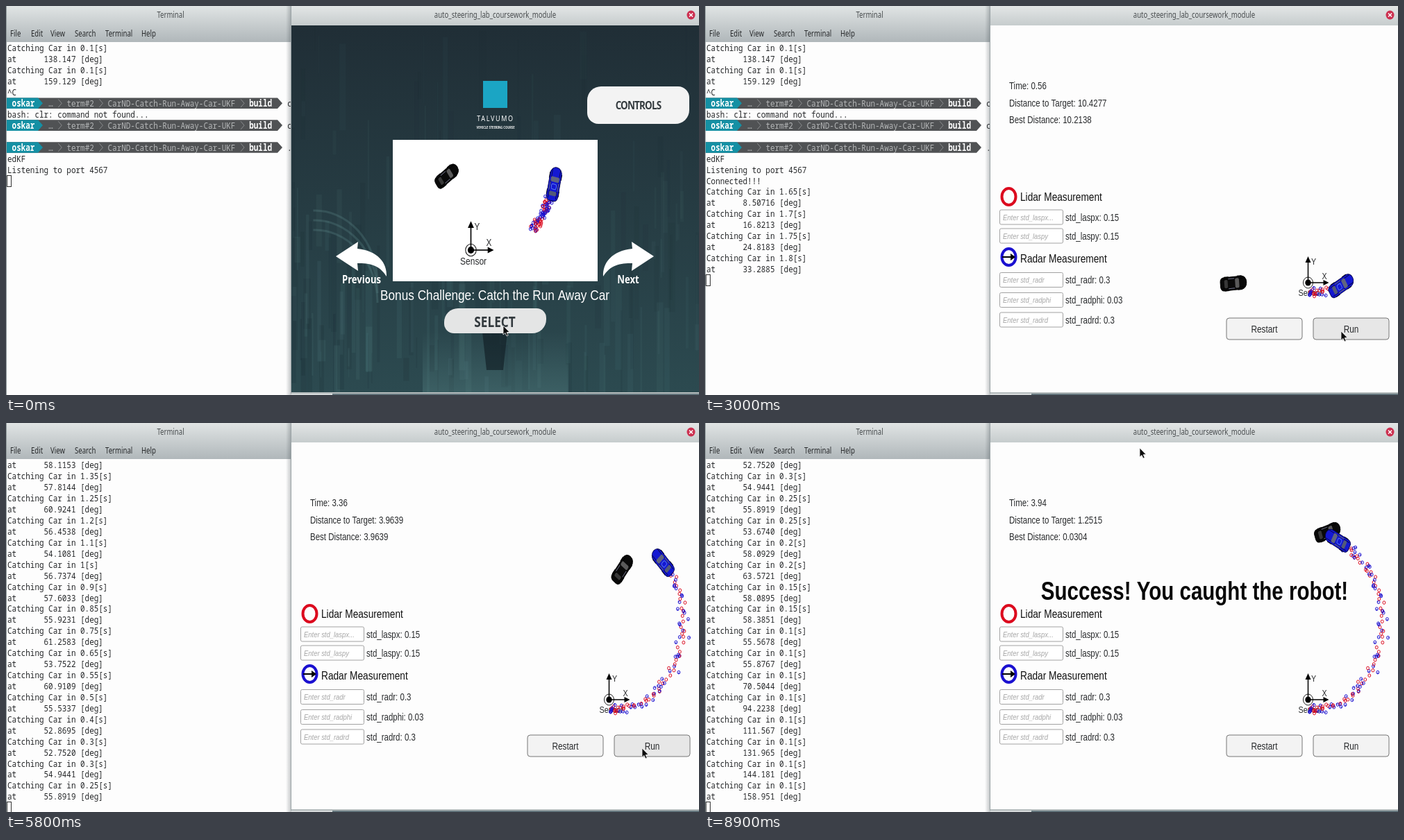
An HTML page with a canvas that plays this animation: 998 by 561 pixels, repeating every 9 s.

```html
<!DOCTYPE html>
<html lang="en">
<head>
<meta charset="utf-8">
<title>Catch the car</title>
<style>
html, body { margin: 0; width: 100%; height: 100%; overflow: hidden; background: #fdfdfd; }
canvas { display: block; }
</style>
</head>
<body>
<canvas id="stage" width="998" height="561"></canvas>
<script>
const ctx = document.getElementById('stage').getContext('2d');
const LOOP = 9000, MENU_END = 400, START = 2440, CAUGHT = 6380;
const CHASE = (CAUGHT - START) / 1000, SWING = 1100;
const SQUEEZE = 0.82;
const SANS = '"Liberation Sans", Arial, sans-serif';
const UI = '"Noto Sans", "Open Sans", sans-serif';
const MONO = '"Noto Sans Mono", "DejaVu Sans Mono", monospace';
const WHITE = '#fdfdfd', INK = '#282a2c', RED = '#dc0a1e', BLUE = '#1a10d0';

const smooth = u => u * u * (3 - 2 * u);
const rad = degrees => degrees * Math.PI / 180;

// Key points start with a time or index; the other columns are interpolated
function sample(keys, t, ease = u => u) {
  const i = keys.findIndex(k => k[0] > t);
  if (i < 0) return keys[keys.length - 1];
  if (i === 0) return keys[0];
  const a = keys[i - 1], b = keys[i], u = ease((t - a[0]) / (b[0] - a[0]));
  return a.map((v, c) => v + (b[c] - v) * u);
}

function seeded(seed) {
  return () => (seed = (seed * 16807) % 2147483647) / 2147483647;
}

// The runner steers onto a circle and follows it at a constant rate
function runnerAt(secs) {
  const grip = Math.min(1, secs / 0.5), angle = 73.4 - 33.2 * secs, r = 131 + 10 * grip;
  return {
    x: 835 + r * Math.cos(rad(angle)),
    y: 288 + r * Math.sin(rad(angle)),
    heading: (angle - 90) * grip
  };
}

const hunterPath = [[START, 721, 399, 0], [3000, 761, 400, -6], [4000, 815, 341, -58], [CAUGHT, 911, 169, -57]];

// After the catch the hunter swings back and forth across the runner
function hunterAt(t) {
  const [, x, y, heading] = sample(hunterPath, t);
  const late = Math.max(0, t - CAUGHT), swing = Math.sin(2 * Math.PI * late / SWING);
  return { x: x - 15 * swing, y: y - 12 * swing, heading: heading + late / 72 };
}

const pointer = [[1300, 716, 461], [2100, 916, 469], [6900, 916, 469], [8300, 626, 36]];

const entry = (secs, deg) => [`Catching Car in ${secs}[s]`, `at      ${deg} [deg]`];
const header = [...entry(0.1, '138.147'), ...entry(0.1, '159.129'), '^C', '$c',
  'bash: clr: command not found...', '$c', '', '$.', 'edKF', 'Listening to port 4567'];

// Trend of the readings: index, seconds to catch, angle
const trend = [[0, 1.65, 9], [4, 1.85, 41], [11, 2.15, 51], [20, 1.9, 59], [28, 1.45, 57],
  [41, 0.3, 58], [50, 0.1, 58], [56, 0.1, 164]];
const READINGS = 57;

function makeLog() {
  const rnd = seeded(915), lines = ['Connected!!!'];
  for (let i = 0; i < READINGS; i++) {
    const [, secs, deg] = sample(trend, i);
    const noise = (rnd() - 0.5) * (1 + i / 4);
    lines.push(...entry(+(Math.round(secs * 20) / 20).toFixed(2), (deg + noise).toPrecision(6)));
  }
  return lines;
}
const logLines = makeLog();

function makeTrail() {
  const rnd = seeded(4721), spread = () => rnd() + rnd() + rnd() - 1.5;
  return Array.from({ length: 150 }, (_, i) => {
    const secs = CHASE * smooth(i / 150), { x, y } = runnerAt(secs);
    const radar = i % 2, noise = radar ? 8 : 4.5;
    return { secs, radar, x: x + spread() * noise, y: y + spread() * noise, turn: rnd() * 6.28 };
  });
}
const trail = makeTrail();

function text(s, x, y, size, { color = INK, font = SANS, style = '', align = 'left', gap = 0 } = {}) {
  ctx.save();
  ctx.translate(x, y + size * 0.36);
  ctx.scale(SQUEEZE, 1);
  ctx.font = `${style} ${size}px ${font}`;
  ctx.textAlign = align;
  ctx.letterSpacing = gap + 'px';
  ctx.fillStyle = color;
  ctx.fillText(s, 0, 0);
  ctx.restore();
}

function rect(x, y, w, h, color) {
  ctx.fillStyle = color;
  ctx.fillRect(x, y, w, h);
}

function box(x, y, w, h, r, fill, stroke) {
  ctx.beginPath();
  ctx.roundRect(x, y, w, h, r);
  ctx.fillStyle = fill;
  ctx.fill();
  if (!stroke) return;
  ctx.strokeStyle = stroke;
  ctx.lineWidth = 1;
  ctx.stroke();
}

function poly(points, color) {
  ctx.beginPath();
  points.forEach(([x, y]) => ctx.lineTo(x, y));
  ctx.closePath();
  ctx.fillStyle = color;
  ctx.fill();
}

function oval(x, y, rx, ry, color, width) {
  ctx.beginPath();
  ctx.ellipse(x, y, rx, ry, 0, 0, 7);
  ctx.fillStyle = ctx.strokeStyle = color;
  ctx.lineWidth = width;
  width ? ctx.stroke() : ctx.fill();
}

function line(x1, y1, x2, y2, color, width) {
  ctx.beginPath();
  ctx.moveTo(x1, y1);
  ctx.lineTo(x2, y2);
  ctx.strokeStyle = color;
  ctx.lineWidth = width;
  ctx.stroke();
}

function shade(x, y, w, h, from, to, sideways) {
  const g = ctx.createLinearGradient(x, y, sideways ? x + w : x, sideways ? y : y + h);
  g.addColorStop(0, from);
  g.addColorStop(1, to);
  rect(x, y, w, h, g);
}

function car({ x, y, heading }, blue, scale = 1) {
  const body = blue ? '#1418d2' : '#0a0a0a', edge = blue ? '#060650' : '#000';
  const h = rad(heading);
  ctx.save();
  ctx.translate(x, y);
  ctx.scale(scale * SQUEEZE, scale);
  ctx.rotate(Math.atan2(Math.sin(h), Math.cos(h) / SQUEEZE));
  for (const wx of [-16, 7]) rect(wx, -10.5, 8, 21, '#050508');
  box(-23, -9.5, 46, 19, [6, 9, 9, 6], body, edge);
  for (const side of [-1, 1]) {
    line(-20, 6.5 * side, 20, 6.5 * side, edge, 1);
    line(-9, 7 * side, 2, 7 * side, '#70738a', 1);
  }
  box(-16, -6, 6, 12, 2, blue ? '#535a78' : '#383838');
  box(3, -7, 7, 14, 2, blue ? '#606580' : '#5a5a5a');
  if (blue) box(-7, -4, 7, 8, 2, body, '#5a7cf0');
  ctx.restore();
}

function dot({ x, y, radar, turn }) {
  oval(x, y, 1.9, 2.3, radar ? BLUE : RED, 1);
  if (radar) line(x, y, x + 2 * Math.cos(turn), y + 2.3 * Math.sin(turn), BLUE, 1);
}

function axes(x, y, scale) {
  ctx.save();
  ctx.translate(x, y);
  ctx.scale(scale, scale);
  oval(0, 0, 7, 8, '#222', 1);
  oval(0, 0, 4.2, 4.6, '#000');
  line(0, 0, 0, -32, '#000', 1.5);
  line(0, 0, 25, 0, '#000', 1.5);
  poly([[0, -38], [-4, -29], [4, -29]], '#000');
  poly([[30, 0], [22, -4], [22, 4]], '#000');
  text('Y', 4.5, -31, 13);
  text('X', 20, -10, 13);
  text('Sensor', -14, 14.5, 13.3);
  ctx.restore();
}

function prompt(y, command) {
  const cell = k => 2 + k * 6.57, top = y - 7.8, low = y + 7.8;
  const gray = { font: MONO, color: '#b4b6b7' }, bold = { font: MONO, color: '#fff', style: 'bold' };
  const ribbon = (end, color) =>
    poly([[0, top], [end, top], [end + 7, y], [end, low], [0, low]], color);
  ribbon(391, '#505254');
  ribbon(46, '#1490a4');
  text('oskar', cell(1), y, 13.35, bold);
  text('…', cell(9), y, 13.35, gray);
  text('term#2', cell(13), y, 13.35, gray);
  text('CarND-Catch-Run-Away-Car-UKF', cell(22), y, 13.35, gray);
  text('build', cell(53), y, 13.35, bold);
  for (const k of [11, 20, 51]) {
    line(cell(k) + 1, top + 2, cell(k) + 6, y, '#8a8c8e', 1);
    line(cell(k) + 6, y, cell(k) + 1, low - 2, '#8a8c8e', 1);
  }
  text(command, 405, y, 13.35, { font: MONO });
}

function terminal(t) {
  const secs = (t - START) / 1000;
  rect(0, 0, 411, 561, WHITE);
  shade(0, 0, 411, 52, '#e0e4e4', '#b0b7ba');
  text('Terminal', 237, 13, 11.7, { font: UI, align: 'center', color: '#4a4e50' });
  const menu = { File: 6, Edit: 36, View: 64, Search: 99, Terminal: 143, Help: 195 };
  for (const name in menu) text(name, menu[name], 40, 11.7, { font: UI });

  const entries = Math.min(READINGS, Math.floor(6.5 * secs + 2 * secs * secs));
  const lines = secs < 0 ? header : header.concat(logLines.slice(0, 1 + 2 * entries));
  const first = Math.max(0, lines.length - 31);
  const rowY = i => 60.6 + (i - first) * 15.93;
  for (let i = first; i < lines.length; i++) {
    if (lines[i][0] === '$') prompt(rowY(i), lines[i][1]);
    else text(lines[i], 2, rowY(i), 13.35, { font: MONO, color: '#252729' });
  }
  ctx.strokeStyle = '#333';
  ctx.lineWidth = 1;
  ctx.strokeRect(1.5, Math.round(rowY(lines.length)) - 7.5, 6, 16);
  rect(0, 0, 1, 561, '#8d9799');
}

// Dim girders and pipes, brighter towards the floor and the left
function backdrop() {
  const rnd = seeded(77);
  shade(411, 28, 587, 530, '#202e36', '#2c4a50');
  for (let i = 0; i < 170; i++) {
    const depth = Math.sqrt(rnd()), side = rnd() ** 1.4, h = 20 + rnd() * 150;
    const tone = rnd() < 0.45 ? '18,30,38' : '92,140,142';
    const glow = 0.02 + 0.13 * depth * (1 - side * 0.5);
    rect(411 + side * 587, 28 + depth * 530 - h / 2, 1 + rnd() * 9, h, `rgba(${tone},${glow})`);
  }
  ctx.strokeStyle = 'rgba(110,160,160,.22)';
  ctx.lineWidth = 3;
  for (let i = 0; i < 3; i++) {
    ctx.beginPath();
    ctx.ellipse(445, 400 + i * 14, 90, 105, 0, -1.6, 0);
    ctx.stroke();
  }
  shade(600, 470, 210, 88, 'rgba(100,150,150,0)', 'rgba(100,150,150,.28)');
  poly([[686, 470], [722, 470], [716, 525], [692, 525]], 'rgba(14,26,33,.6)');
}

function curvedArrow(mirror) {
  ctx.save();
  if (mirror) { ctx.translate(1408, 0); ctx.scale(-1, 1); }
  ctx.beginPath();
  ctx.moveTo(475, 361);
  ctx.lineTo(507, 340);
  ctx.lineTo(506, 350);
  ctx.bezierCurveTo(535, 353, 549, 370, 548, 390);
  ctx.bezierCurveTo(537, 373, 524, 371, 506, 371);
  ctx.lineTo(507, 382);
  ctx.closePath();
  ctx.fillStyle = '#fff';
  ctx.fill();
  ctx.restore();
}

function menuScene() {
  const white = { color: '#fff', align: 'center' }, bold = { ...white, font: UI, style: 'bold' };
  backdrop();
  rect(687, 108, 35, 39, '#1ba5c4');
  text('TALVUMO', 705, 162, 11, { ...white, font: UI, gap: 2 });
  text('VEHICLE STEERING COURSE', 705, 175.5, 5, bold);
  rect(557, 193, 295, 204, '#fff');
  const rnd = seeded(31);
  for (let i = 0; i < 80; i++) {
    const u = i / 80, jitter = () => (rnd() - 0.5) * 13;
    dot({ x: 783 - 24 * u + jitter(), y: 278 + 47 * u + jitter() * 0.6, radar: rnd() < 0.5, turn: rnd() * 6 });
  }
  car({ x: 635, y: 245, heading: -41 }, false, 0.97);
  car({ x: 789.5, y: 257, heading: -80 }, true, 1.06);
  axes(669.5, 352, 1.1);
  curvedArrow(false);
  curvedArrow(true);
  text('Previous', 512, 394, 16, bold);
  text('Next', 896, 394, 16, bold);
  text('Bonus Challenge: Catch the Run Away Car', 704, 416, 21, white);
  box(631, 436, 147, 36, [20, 14], '#e4e5e5');
  text('SELECT', 704, 455, 21, { ...bold, color: '#333a3e' });
  box(837, 116, 147, 54, [20, 16], '#f3f3f3');
  text('CONTROLS', 910.5, 143, 16.4, { ...bold, color: '#333a3e', gap: -1 });
}

function field(y, name, value, hint = '') {
  box(424.5, y - 10.5, 91, 21, 2, '#fff', '#a2a2a2');
  text(`Enter std_${name}${hint}`, 429, y, 11.5, { style: 'italic', color: '#a6a6a6' });
  text(`std_${name}: ${value}`, 519, y, 14);
}

function button(label, x, hover) {
  box(x, 450, 109, 31, 4, hover ? '#e7e7e7' : '#f3f3f3', '#777');
  text(label, x + 54.5, 466, 14.4, { align: 'center' });
}

const gap = (a, b) => Math.hypot(a.x - b.x, a.y - b.y);
const FIRST_GAP = 10.2138, UNIT = gap(runnerAt(0), hunterAt(0)) / FIRST_GAP;

function simScene(t, mouseX, mouseY) {
  const secs = Math.min(CHASE, Math.max(0, (t - START) / 1000));
  const runner = runnerAt(secs), hunter = hunterAt(t);
  const closest = t < CAUGHT + SWING ? 0.047 : 0.0304;
  const dist = Math.max(closest, gap(runner, hunter) / UNIT);
  const best = t < CAUGHT ? Math.min(FIRST_GAP, dist) : closest;

  rect(411, 27, 587, 531, WHITE);
  text(`Time: ${secs.toFixed(2)}`, 438, 115, 14);
  text(`Distance to Target: ${dist.toFixed(4)}`, 438, 139.5, 14);
  text(`Best Distance: ${best.toFixed(4)}`, 438, 163.5, 14);

  oval(437.5, 275, 10, 12, RED, 4);
  text('Lidar Measurement', 454, 275, 16.7, { color: '#111' });
  oval(437.5, 362, 10, 12, BLUE, 4);
  line(428, 362, 442, 362, '#000', 2);
  poly([[447, 362], [440, 357], [440, 367]], '#000');
  text('Radar Measurement', 454, 364, 16.7, { color: '#111' });
  field(304.5, 'laspx', 0.15, '...');
  field(331.5, 'laspy', 0.15);
  field(395, 'radr', 0.3);
  field(424, 'radphi', 0.03);
  field(452.5, 'radrd', 0.3);
  button('Restart', 751, false);
  button('Run', 876, mouseX > 876 && mouseY > 450);

  axes(868.5, 399, 1);
  trail.filter(d => d.secs < secs).forEach(dot);
  car(hunter, false);
  car(runner, true);
  if (t >= CAUGHT) {
    text('Success! You caught the robot!', 705, 242, 36, { style: 'bold', color: '#080808', align: 'center' });
  }
}

function simWindow(t, mouseX, mouseY) {
  shade(403, 0, 8, 561, 'rgba(60,70,75,0)', 'rgba(60,70,75,.32)', true);
  if (t < MENU_END) menuScene();
  else simScene(t, mouseX, mouseY);
  shade(411, 0, 587, 28, '#e3e6e6', '#c6cccd');
  text('auto_steering_lab_coursework_module', 704.5, 13, 11.7, { font: UI, align: 'center', color: '#4a4e50' });
  oval(986.5, 13, 6, 6.5, '#cc3050');
  line(984, 10.5, 989, 15.5, '#fff', 1.5);
  line(989, 10.5, 984, 15.5, '#fff', 1.5);
  rect(411, 557, 587, 2, '#b5bcbd');
  rect(411, 559, 59, 2, '#d5d9da');
  rect(470, 559, 528, 2, '#66777e');
  rect(410, 0, 1, 559, '#9aa3a6');
}

function mouse(x, y) {
  ctx.save();
  ctx.translate(x, y);
  poly([[0, 0], [0, 13], [3, 10.5], [5, 15], [7.2, 14], [5.2, 9.7], [9, 9.3]], '#0c0c0c');
  ctx.strokeStyle = '#f4f4f4';
  ctx.lineWidth = 0.8;
  ctx.stroke();
  ctx.restore();
}

const born = performance.now();
function frame() {
  const t = (performance.now() - born) % LOOP;
  const [, mx, my] = sample(pointer, t, smooth);
  terminal(t);
  simWindow(t, mx, my);
  mouse(mx, my);
  requestAnimationFrame(frame);
}
frame();
</script>
</body>
</html>
```
